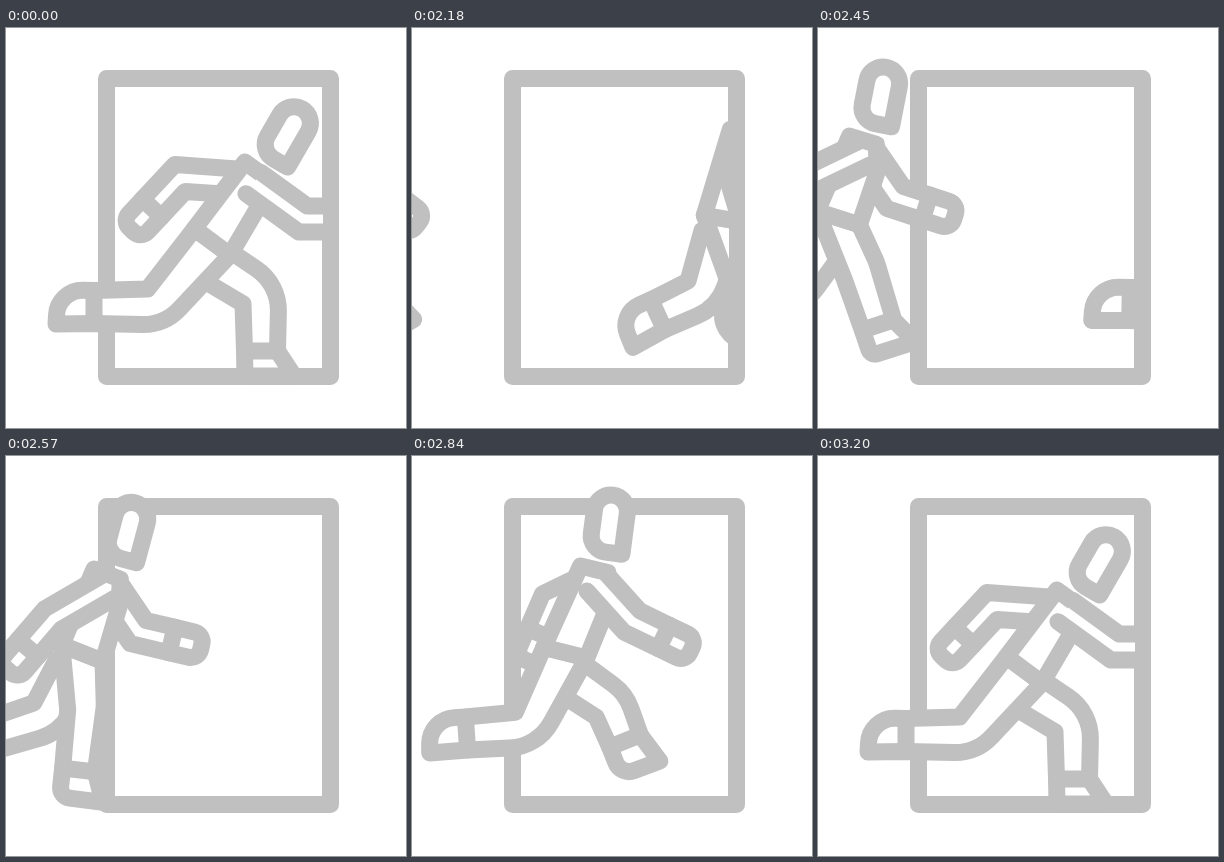
These frames come from a looping animation (400x400 px, 3.23 s). An HTML page with a canvas:

```html
<!DOCTYPE html>
<html>
<head>
<meta charset="utf-8">
<style>
  html, body { margin: 0; height: 100%; overflow: hidden; background: #fff; }
  canvas { display: block; }
</style>
</head>
<body>
<canvas id="stage" width="400" height="400"></canvas>
<script>
const ctx = document.getElementById('stage').getContext('2d');
const LOOP = 3230, START = 2000, STEP = 30;

// neck x y, lean, hip x y, then [elbow, wrist] per arm and
// [knee, ankle, toe point] per leg; near limb first, far limb second
const reach = [-25,103,7, -42,200, -85,150,-110,180, 22,163,50,175, 5,234,47,280,0, -85,255,-150,270,1];
const stance = [88,113,15, 68,213, 47,163,22,192, 132,176,166,184, 80,252,73,314,.35, 40,262,-18,280,1];
const pass = [125,98,0, 119,207, 168,153,196,180, 128,150,128,180, 92,270,36,279,1, 160,245,170,273,1];
const stride = [212,122,15, 175,220, 272,178,308,182, 153,145,127,175, 137,277,73,276,1, 238,254,256,297,0];
const rest = [239,134,30, 194,227, 297,191,334,191, 174,150,146,180, 150,279,88,279,1, 255,266,255,323,0];

const X_SLOTS = new Set([0, 3, 5, 7, 9, 11, 13, 15, 18, 20]);
const shift = (pose, dx) => pose.map((v, i) => X_SLOTS.has(i) ? v + dx : v);
const swap = p => [...p.slice(0, 5), ...p.slice(9, 13), ...p.slice(5, 9), ...p.slice(18), ...p.slice(13, 18)];

const leaving = [
  [2000, rest],
  [2110, swap(shift(stance, 196))],
  [2200, swap(shift(pass, 203))],
  [2330, swap(shift(stride, 178))],
  [2570, swap(shift(stride, 300))]
];
const arriving = [
  [2090, swap(shift(pass, -255))],
  [2330, reach],
  [2570, stance],
  [2720, pass],
  [2960, stride],
  [3200, rest]
];

function poseAt(keys, t) {
  const next = keys.findIndex(k => k[0] > t);
  if (next === 0) return keys[0][1];
  if (next < 0) return keys[keys.length - 1][1];
  const [t0, a] = keys[next - 1], [t1, b] = keys[next];
  let u = (t - t0) / (t1 - t0);
  if (b === rest) u = 1 - (1 - u) ** 2;
  return a.map((v, i) => v + (b[i] - v) * u);
}

const along = (p, d, n, u, v) => [p[0] + d[0] * u + n[0] * v, p[1] + d[1] * u + n[1] * v];
const normal = d => [d[1], -d[0]];
function direction(a, b) {
  const x = b[0] - a[0], y = b[1] - a[1], len = Math.hypot(x, y) || 1;
  return [x / len, y / len];
}
function turn([x, y], lean, dx, dy) {
  const a = lean * Math.PI / 180, c = Math.cos(a), s = Math.sin(a);
  return [x + dx * c - dy * s, y + dx * s + dy * c];
}
const to = p => ctx.lineTo(...p);
const round = (p, q, r) => ctx.arcTo(...p, ...q, r);

function line(...points) {
  ctx.beginPath();
  points.forEach(to);
  ctx.stroke();
}
function paint() {
  ctx.fill();
  ctx.stroke();
}

// Outline of a two-part limb: both sides at root, joint and end
function outline(root, joint, end, wRoot, wJoint, wEnd) {
  const d1 = direction(root, joint), d2 = direction(joint, end);
  const n1 = normal(d1), n2 = normal(d2);
  const k = 1 / Math.max(.4, 1 + n1[0] * n2[0] + n1[1] * n2[1]);
  const miter = [(n1[0] + n2[0]) * k, (n1[1] + n2[1]) * k];
  const side = s => [along(root, d1, n1, 0, s * wRoot), along(joint, d1, miter, 0, s * wJoint), along(end, d2, n2, 0, s * wEnd)];
  return { back: side(-1), front: side(1), at: (u, v) => along(end, d2, n2, u, v) };
}

function arm(shoulder, elbow, wrist) {
  const { back, front, at } = outline(shoulder, elbow, wrist, 13, 13, 13);
  ctx.beginPath();
  back.forEach(to);
  round(at(30, -13), at(30, 13), 10);
  round(at(30, 13), front[2], 10);
  front.reverse().forEach(to);
  paint();
  line(back[2], front[0]);
}

function leg(hip, knee, ankle, point, rootBack, rootFront) {
  const { back, front, at } = outline(hip, knee, ankle, 20, 18, 16.5);
  const toe = at(25 + 13 * point, 33 - 16 * point);
  const top = rootFront || front[0];
  ctx.beginPath();
  to(rootBack || back[0]);
  to(back[1]);
  to(back[2]);
  round(at(25 + 11 * point, -16 - point), toe, 2 + 24 * point);
  to(toe);
  to(front[2]);
  round(front[1], top, 50);
  to(top);
  ctx.closePath();
  paint();
  line(back[2], front[2]);
}

function head(neck, lean) {
  ctx.save();
  ctx.translate(...turn(neck, lean, 23, -58));
  ctx.rotate(lean * Math.PI / 180);
  ctx.beginPath();
  ctx.arc(0, 0, 16.5, Math.PI, 0);
  ctx.lineTo(16.5, 41);
  ctx.arcTo(-16.5, 41, -16.5, 0, 16.5);
  ctx.closePath();
  paint();
  ctx.restore();
}

function runner(p) {
  const at = i => [p[i], p[i + 1]];
  const neck = at(0), lean = p[2], hip = at(3);
  const shoulder = turn(neck, lean, 18, 14);
  const waistBack = turn(hip, lean, -18, -20), waistFront = turn(hip, lean, 26, -15);
  arm(shoulder, at(9), at(11));
  leg(hip, at(18), at(20), p[22]);
  leg(hip, at(13), at(15), p[17], waistBack, waistFront);
  ctx.beginPath();
  [neck, turn(neck, lean, 28, 3), turn(neck, lean, 34, 30), waistFront, waistBack].forEach(to);
  ctx.closePath();
  paint();
  arm(shoulder, at(5), at(7));
  head(neck, lean);
}

function draw(now) {
  const t = START + STEP * Math.floor(Math.max(0, now % LOOP - START) / STEP);
  ctx.fillStyle = '#fff';
  ctx.strokeStyle = '#c0c0c0';
  ctx.lineWidth = 17;
  ctx.lineCap = ctx.lineJoin = 'round';
  ctx.fillRect(0, 0, 400, 400);
  ctx.strokeRect(100.5, 50.5, 224, 298);
  ctx.save();
  ctx.beginPath();
  ctx.rect(0, 0, 317, 400);
  ctx.clip();
  if (t < 2570) runner(poseAt(leaving, t));
  if (t > 2090) runner(poseAt(arriving, t));
  ctx.restore();
  requestAnimationFrame(tick);
}
const begin = performance.now();
const tick = () => draw(performance.now() - begin);
tick();
</script>
</body>
</html>
```
